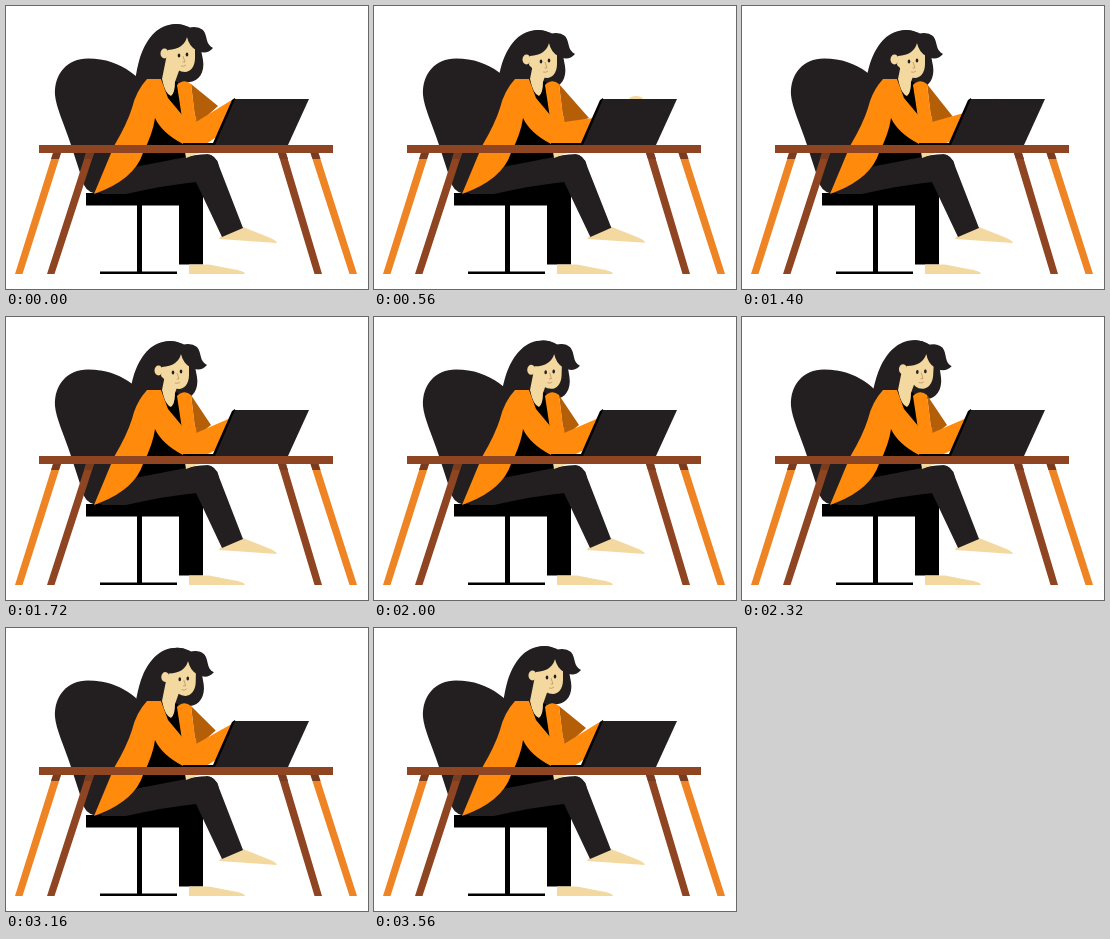
An HTML page for the animation above (3.6 s loop, 362 by 283 pixels).

```html
<!DOCTYPE html>
<html lang="en">
<head>
<meta charset="utf-8">
<title>Working at a desk</title>
<style>
  html, body { margin: 0; width: 100%; height: 100%; overflow: hidden; background: #fff; }
  svg { display: block; width: 362px; height: 283px; }
  .dark { fill: #231f20; }
  .skin { fill: #f3d9a0; }
  .orange { fill: #ff8a0c; }
  .shade { fill: #b45f08; }
  .wood { fill: #8f4522; }
  .leg { fill: #ee8424; }
</style>
</head>
<body>
<svg viewBox="0 0 362 283">
  <!-- chair -->
  <path class="dark" d="M82 52.500C61 52.500 48 68 49 89C50 101 58 118 65 139L78 179Q82 188 95 188H150V95C138 74 117 52.500 82 52.500Z"/>
  <path d="M80 187H120L150 176H197V199.500H136V265.500H171V268H94V265.500H131V199.500H80Z"/>

  <!-- legs -->
  <path d="M132 140H184L182 153L197 165V258.500H173V182H118Z"/>
  <path class="skin" d="M183 258.500H203L226 263Q239 265 239 268H183Z"/>
  <g id="shin">
    <path class="skin" d="M214 231L237 221L262 231Q270 234 271 237L213 233Z"/>
    <path class="dark" d="M190 176L216 231L237 222L213 160Q209 148 200 148Z"/>
  </g>
  <path class="dark" d="M95 188L115 166L128 161Q155 156 180 151Q197 147 205 149Q213 153 213 163L203 184Q199 176 190 176Q160 179 120 188Z"/>
  <path class="skin" d="M179 146H196L180 152Z"/>

  <!-- torso and head -->
  <path class="dark" id="backHair" d="M170 18C152 18 142 32 136 46C131 58 128 78 126 103L148 94L170 78L184 76C193 75 199 66 197 54L192 28Q183 18 170 18Z"/>
  <path d="M148 76L158 72L172 76L178 113L180 140H134L140 105Z"/>
  <path class="skin" d="M161 48L156 73Q159 88 165 90Q169 87 169 76L174 62Z"/>
  <path class="shade" id="farArm"/>
  <path class="orange" d="M171 79Q178 72 185 78L190 118L176 112Z"/>
  <path class="orange" d="M141 73H155L162 92L177 110L190 110L192 138H177Q156 127 149 112Q147 127 137 147Q128 174 88 188L108 140Q121 118 126 102Q130 85 141 73Z"/>
  <path class="orange" id="forearm"/>
  <g id="head">
    <path class="skin" d="M162 43C171 42 178 37 181 30Q184 38 189 43V52C189 61 184 66 179 66Q175 66 172 64L161 53Z"/>
    <path class="dark" d="M170 18Q178 18 182 22Q191 19 197 24C202 30 199 38 207 42Q200 50 190 44Q183 40 181 31Q178 43 162 44L146 36Q154 19 170 18Z"/>
    <ellipse class="skin" cx="158.500" cy="47.500" rx="4" ry="5"/>
    <ellipse class="dark" cx="173" cy="49.500" rx="1.300" ry="2"/>
    <ellipse class="dark" cx="181" cy="48.500" rx="1.300" ry="2"/>
    <path d="M177 50L179 56H176.500M175 60Q178 61 180 59" fill="none" stroke="#b98b55" stroke-width=".7"/>
  </g>

  <!-- laptop -->
  <ellipse class="skin" id="farHand" rx="7" ry="3"/>
  <path d="M177 137H207L226 94L229 92L240 139H177Z"/>
  <path class="dark" d="M229 93H303L282 139H209Z"/>

  <!-- table -->
  <path class="leg" d="M47 147H55L16.500 268H9ZM304.500 147H312.500L351 268H343.500Z"/>
  <path class="wood" d="M33 139H327V147H33ZM80 147H88L48.500 268H41ZM272 147H280L316 268H308.500Z"/>
  <path fill="#793c20" d="M47 147H55L53 153H45ZM80 147H88L86 153H78ZM272 147H280L282 153H274ZM304.500 147H312.500L314.500 153H306.500Z"/>
</svg>
<script>
const LOOP = 3600, TAP = 1800;
const part = id => document.getElementById(id);
const set = (id, name, value) => part(id).setAttribute(name, value);
const smooth = x => x * x * (3 - 2 * x);
const progress = (t, start, end) => Math.min(1, Math.max(0, (t - start) / (end - start)));

// Each pose: head [x, y, angle], far elbow, forearm top and underside, far hand.
const desk = { head: [0, 0, 0], elbow: [212, 100], wrist: [229, 92], cuff: [212, 130], hand: [246, 99] };
const reach = { head: [-6, 6, 0], elbow: [215, 112], wrist: [219, 112], cuff: [212, 137], hand: [262, 93] };
const look = { head: [1, 5, 3], elbow: [205, 108], wrist: [227, 100], cuff: [212, 132], hand: [246, 99] };

const headMoves = [[0, 560, reach], [1720, 2240, look], [2840, 3360, desk]];
const armMoves = [[0, 560, reach], [1160, 1680, look], [2840, 3360, desk]];

function poseAt(moves, key, t) {
  let value = desk[key];
  for (const [start, end, pose] of moves) {
    const k = smooth(progress(t, start, end));
    value = value.map((v, i) => v + (pose[key][i] - v) * k);
  }
  return value;
}

function draw(now) {
  const t = now % LOOP;
  const [x, y, angle] = poseAt(headMoves, 'head', t);
  const move = `translate(${x} ${y}) rotate(${angle} 165 75)`;
  set('head', 'transform', move);
  set('backHair', 'transform', move);

  const [elbow, wrist, cuff, hand] =
    ['elbow', 'wrist', 'cuff', 'hand'].map(key => poseAt(armMoves, key, t));
  set('farArm', 'd', `M185 78L${elbow}L190 120Z`);
  set('forearm', 'd', `M177 110L190 116L${wrist}L${cuff}L200 138H177Z`);
  set('farHand', 'cx', hand[0]);
  set('farHand', 'cy', hand[1]);

  const lift = Math.sin(Math.PI * progress(t % TAP, 500, 1300)) ** 2;
  set('shin', 'transform', `rotate(${-5.3 * lift} 203 158)`);
  requestAnimationFrame(draw);
}
requestAnimationFrame(draw);
</script>
</body>
</html>
```
